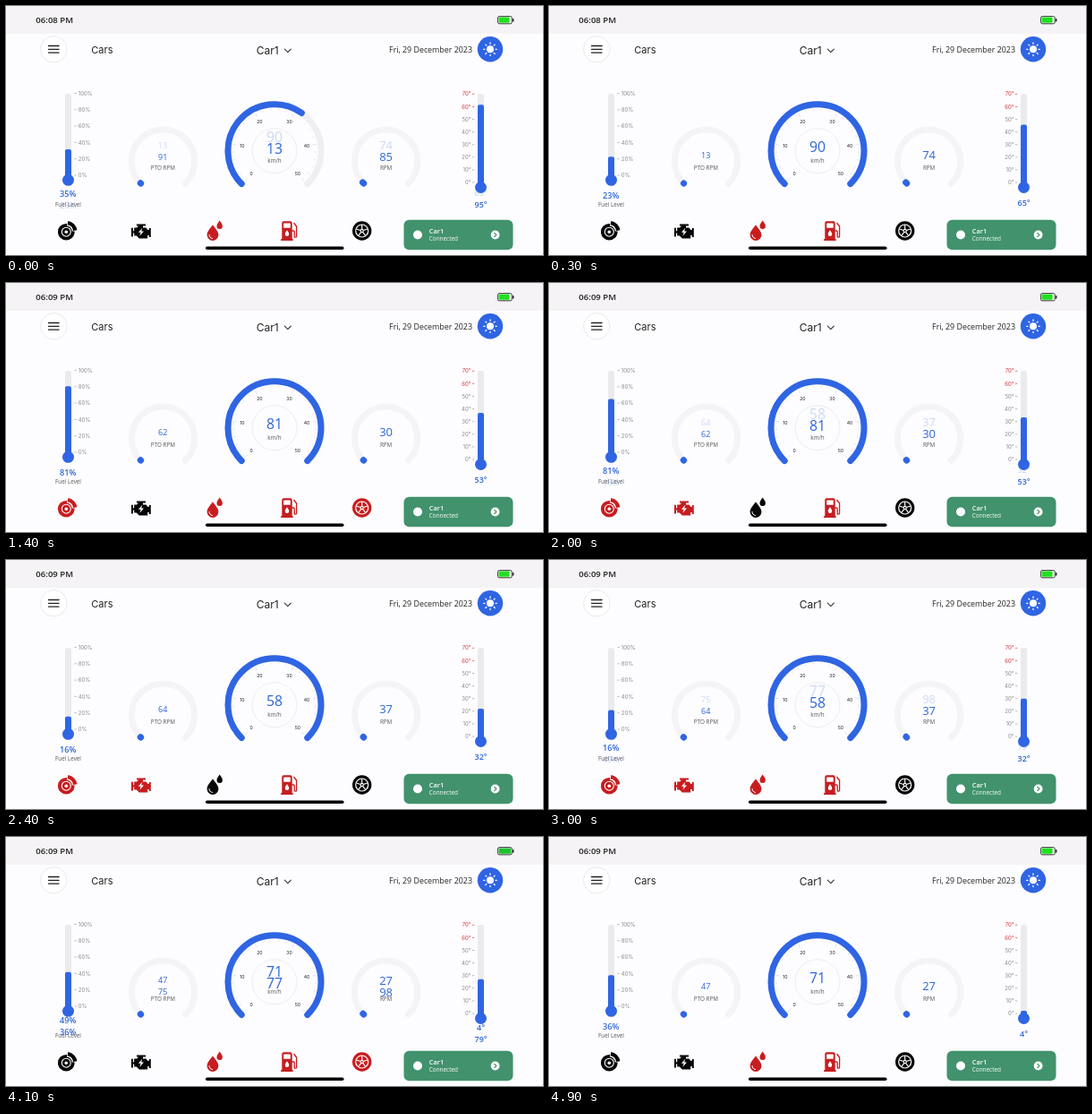
An HTML page that plays this animation: 600 px wide and 278 px high, repeating every 5 s.

```html
<!DOCTYPE html>
<html lang="en">
<head>
<meta charset="utf-8">
<title>Car dashboard</title>
<style>
  html, body { margin: 0; width: 100%; height: 100%; overflow: hidden; background: #fdfcfe; }
  svg { display: block; width: 100%; height: 100%; }
  text { font-family: "Open Sans", "Noto Sans", sans-serif; fill: #222; }
  .ui { font-family: Inter, sans-serif; }
  .mid { text-anchor: middle; }
  .end { text-anchor: end; }
  .value { fill: #2c66d6; text-anchor: middle; }
  .bold { font-weight: 600; }
  .scale { font: 6px Inter, sans-serif; fill: #8b8b90; }
  .hot { fill: #d8373c; }
  .unit { font-size: 6.3px; fill: #555; text-anchor: middle; }
  .white { fill: #fff; }
  .blue { fill: #2f65e3; }
  .line { fill: none; stroke-linecap: round; stroke-linejoin: round; }
  .icon { fill: currentColor; }
</style>
</head>
<body>
<svg id="stage" viewBox="0 0 600 278">
  <rect width="600" height="278" fill="#fdfcfe"/>
  <rect width="600" height="31" fill="#f5f3f5"/>
  <text id="clock" class="bold" x="33.3" y="18.7" font-size="9.6"></text>

  <rect x="549.6" y="11.6" width="15.6" height="8.2" rx="1.6" fill="#fff" stroke="#222" stroke-width=".9"/>
  <rect x="566" y="14" width="1.4" height="3.6" rx=".6" fill="#222"/>
  <rect id="charge" x="550.6" y="12.6" height="6.2" rx=".8"/>

  <circle cx="53.3" cy="48.3" r="14.7" fill="#fff" stroke="#e7e7ec" stroke-width=".9"/>
  <path class="line" d="M47.5 44.5h11.6M47.5 48.3h11.6M47.5 52.1h11.6" stroke="#222" stroke-width="1.3"/>
  <text class="ui" x="95.3" y="52.7" font-size="11">Cars</text>
  <text class="ui" x="279.7" y="54" font-size="12">Car1</text>
  <path class="line" d="M311.3 48.2l3.5 3.5 3.5-3.5" stroke="#333" stroke-width="1.1"/>
  <text class="end" x="521" y="51.6" font-size="8.9">Fri, 29 December 2023</text>
  <circle class="blue" cx="541" cy="48.3" r="14.2"/>
  <circle class="white" cx="541" cy="48.3" r="4"/>
  <g id="rays" class="line" stroke="#fff" stroke-width="1.3"></g>

  <g id="meters"></g>

  <g class="icon">
    <circle cx="67.3" cy="252.2" r="9.3"/>
    <circle cx="67.3" cy="252.2" r="5" fill="none" stroke="#fff" stroke-width="1.1"/>
    <circle class="white" cx="67.3" cy="252.2" r="1.8"/>
    <path d="M68.3 241.8A10.2 10.2 0 0 1 77.6 251.4" fill="none" stroke="#fdfcfe" stroke-width="7.4"/>
    <path d="M69 242.2A9.8 9.8 0 0 1 77.2 250.6" fill="none" stroke="currentColor" stroke-width="4.4"/>
  </g>
  <g class="icon">
    <path d="M146 243.5h10v2h-3v2h3.5l2 2.5h1.3v-2h2v10h-2v-2h-1.6v3.4h-9.4l-3-2.8h-2.6v-3.2h-1.2v4h-2v-9.6h2v3.4h1.2v-3.7h3l1.8-2h1v-0h-3z"/>
    <path class="white" d="M152.3 247.8l-4.4 5h2.7l-1.2 4 4.6-5.2h-2.8z"/>
  </g>
  <g class="icon">
    <path d="M231 244.2c2.5 4 6.4 7 6.4 11.3a6.4 6.4 0 0 1-12.8 0c0-4.300 3.900-7.300 6.400-11.300z"/>
    <path d="M238.700 239.600c1.200 2.200 3.200 3.800 3.200 6.200a3.200 3.200 0 0 1-6.400 0c0-2.400 2-4 3.200-6.200z"/>
    <path class="line" d="M227 255.500c0 2.300 1.500 3.700 3.500 4" stroke="#fff" stroke-width="1"/>
  </g>
  <g class="icon">
    <path d="M308.300 242.200q0-2 2-2h7.400q2 0 2 2v18h1v1.800h-13.600v-1.800h1.200z"/>
    <rect class="white" x="310.200" y="242.600" width="7.600" height="5.200" rx=".6"/>
    <path class="white" d="M314 250.300c1.300 2 2.200 2.900 2.200 4.400a2.200 2.200 0 0 1-4.400 0c0-1.500.9-2.400 2.200-4.400z"/>
    <path class="line" d="M319.700 251h1.500q1 0 1 1v5a1.200 1.200 0 0 0 2.400 0v-11l-2.800-3.500" stroke="currentColor" stroke-width="1.300"/>
  </g>
  <g class="icon">
    <circle cx="397.700" cy="251" r="10.700"/>
    <circle cx="397.700" cy="251" r="7" fill="none" stroke="#fff" stroke-width="1.200"/>
    <g id="spokes" class="line" stroke="#fff" stroke-width="1.200"></g>
    <circle class="white" cx="397.700" cy="251" r="2.200"/>
    <circle cx="397.700" cy="251" r="1"/>
  </g>

  <rect x="223" y="268.600" width="154.500" height="3.500" rx="1.750" fill="#000"/>
  <rect x="444.500" y="238.800" width="122" height="33.400" rx="6" fill="#41926d"/>
  <circle class="white" cx="460" cy="255.500" r="5"/>
  <text class="bold white" x="472.800" y="254.200" font-size="7.400">Car1</text>
  <text class="white" x="472.800" y="262" font-size="6.400">Connected</text>
  <circle class="white" cx="546.600" cy="255.500" r="4.900"/>
  <path class="line" d="M545.700 253.300l2.200 2.200-2.200 2.200" stroke="#41926d" stroke-width="1.200"/>
</svg>

<script>
const $ = id => document.getElementById(id);
const polar = (cx, cy, r, deg) => {
  const a = deg * Math.PI / 180;
  return [cx + r * Math.cos(a), cy + r * Math.sin(a)];
};
const spoke = (cx, cy, r1, r2, deg) =>
  `M${polar(cx, cy, r1, deg)}L${polar(cx, cy, r2, deg)}`;
const range = (n, f) => Array.from({ length: n }, (_, i) => f(i)).join('');
const arc = (cx, cy, r, sweep) =>
  `M${polar(cx, cy, r, 135)}A${r} ${r} 0 ${+(sweep > 180)} 1 ${polar(cx, cy, r, 135 + sweep)}`;

const gauges = [
  { key: 'speed', cx: 300, cy: 161.7, r: 52, max: 50, track: '#efeff1' },
  { key: 'pto', cx: 175.5, cy: 173.2, r: 35.2, max: 25000, track: '#f4f4f6' },
  { key: 'rpm', cx: 424.6, cy: 173.2, r: 35.2, max: 8000, track: '#f4f4f6' }
];
const tubes = [
  { key: 'fuel', x: 69.5, bottom: 189, bulb: 194.3, zero: 189.5, unit: 0.918 },
  { key: 'temp', x: 530.5, bottom: 198, bulb: 202.5, zero: 198, unit: 1 }
];
// Rolling readouts; enter is the side from which a new value slides in.
const readouts = [
  { key: 'speed', x: 300, y: 162.7, size: 15.8, enter: -1, suffix: '' },
  { key: 'pto', x: 175.2, y: 169.8, size: 9, enter: -1, suffix: '' },
  { key: 'rpm', x: 424.6, y: 171, size: 13, enter: -1, suffix: '' },
  { key: 'fuel', x: 69.3, y: 214.9, size: 9.2, enter: 1, suffix: '%', bold: true },
  { key: 'temp', x: 530.6, y: 222.7, size: 9, enter: -1, suffix: '°', bold: true }
];

const row = (speed, pto, rpm, fuel, temp) => ({ speed, pto, rpm, fuel, temp });
const states = [
  row(13, 91, 85, 35, 95), row(90, 13, 74, 23, 65), row(81, 62, 30, 81, 53),
  row(58, 64, 37, 16, 32), row(77, 75, 98, 49, 79), row(71, 47, 27, 36, 4),
  row(80, 50, 40, 96, 6)
];
// One digit per warning icon: 1 = red, 0 = black.
const warnings = ['00110', '10111', '11010', '11110', '00111', '00110'];

$('rays').innerHTML = `<path d="${range(8, i => spoke(541, 48.3, 6, 7.3, i * 45))}"/>`;
$('spokes').innerHTML = `<path d="${range(5, i => spoke(397.7, 251, 2.5, 6.5, i * 72 - 90))}"/>`;

const speed = gauges[0];
const dial = range(26, i =>
  `<path d="${spoke(speed.cx, speed.cy, i % 5 ? 45 : 43, 47, 135 + i * 10.8)}" stroke="#cbd5e8" stroke-width=".6"/>`
) + range(6, i => {
  const [x, y] = polar(speed.cx, speed.cy, 36.5, 135 + i * 54);
  return `<text class="ui mid" x="${x}" y="${y + 1.9}" font-size="5.2">${i * 10}</text>`;
}) + `<circle cx="300" cy="161.7" r="25" fill="none" stroke="#e9e9ee" stroke-width=".8"/>`;

const fuelScale = range(6, i => {
  const y = 99.6 + i * 18.3;
  return `<path d="M76.500 ${y - 2.1}h2.200" stroke="#9a9aa0" stroke-width=".7"/>
    <text class="scale" x="80.8" y="${y}">${100 - i * 20}%</text>`;
});
const tempScale = range(8, i => {
  const y = 100.4 + i * 14.1;
  return `<path d="M521 ${y - 2.1}h2.200" stroke="${i < 2 ? '#d8373c' : '#9a9aa0'}" stroke-width=".7"/>
    <text class="scale end ${i < 2 ? 'hot' : ''}" x="519.500" y="${y}">${70 - i * 10}°</text>`;
});

$('meters').innerHTML =
  gauges.map(g => `<g class="line" stroke-width="7">
    <path d="${arc(g.cx, g.cy, g.r, 270)}" stroke="${g.track}"/>
    <path id="arc-${g.key}" stroke="#2f65e3"/></g>`).join('') +
  dial + fuelScale + tempScale +
  tubes.map(t => `<rect x="${t.x - 3.5}" y="98" width="7" height="${t.bottom - 98}" rx="2.5" fill="#ebebed"/>
    <rect id="bar-${t.key}" class="blue" x="${t.x - 3.5}" width="7" rx="2"/>
    <circle class="blue" cx="${t.x}" cy="${t.bulb}" r="6.5"/>`).join('') +
  `<text class="unit" x="300" y="174.600">km/h</text>
   <text class="unit" x="175.400" y="183.400">PTO RPM</text>
   <text class="unit" x="424.600" y="183.400">RPM</text>
   <text class="unit" x="69.500" y="224">Fuel Level</text>` +
  readouts.map(r => ['old', 'new'].map(part =>
    `<text id="${part}-${r.key}" class="value ${r.bold ? 'bold' : ''}" x="${r.x}" font-size="${r.size}"></text>`
  ).join('')).join('');

const icons = [...document.querySelectorAll('g.icon')];
const LOOP = 5000, STEP = 100, LEAD = 100, TRAVEL = 13;
const smooth = u => {
  u = Math.min(1, Math.max(0, u));
  return u * u * (3 - 2 * u);
};

function place(id, text, y, opacity) {
  const el = $(id);
  el.textContent = text;
  el.setAttribute('y', y);
  el.setAttribute('opacity', opacity);
}

function render(time) {
  const t = Math.floor((time % LOOP) / STEP) * STEP;
  const turn = Math.floor((t + LEAD) / 1000);
  const elapsed = (t + LEAD) % 1000;
  const from = states[turn], to = states[turn + 1];
  const slide = smooth(elapsed / 400);
  const fill = smooth((elapsed + 60) / 500);
  const level = key => from[key] + (to[key] - from[key]) * fill;

  for (const g of gauges) {
    const sweep = Math.min(1, level(g.key) / g.max) * 270;
    $('arc-' + g.key).setAttribute('d', arc(g.cx, g.cy, g.r, sweep));
  }
  for (const b of tubes) {
    const top = b.zero - level(b.key) * b.unit;
    const bar = $('bar-' + b.key);
    bar.setAttribute('y', top);
    bar.setAttribute('height', b.bulb - top);
  }
  for (const r of readouts) {
    place('old-' + r.key, from[r.key] + r.suffix, r.y - r.enter * TRAVEL * slide, smooth(2 - 2 * slide));
    place('new-' + r.key, to[r.key] + r.suffix, r.y + r.enter * TRAVEL * (1 - slide), smooth(2 * slide));
  }
  icons.forEach((icon, i) => { icon.style.color = warnings[turn][i] === '1' ? '#c71d20' : '#050505'; });

  const charging = elapsed >= 200 && elapsed < 400;
  $('charge').setAttribute('width', charging ? 13.6 : 12);
  $('charge').setAttribute('fill', charging ? '#20c030' : '#1fe01f');
  $('clock').textContent = turn ? '06:09 PM' : '06:08 PM';
}

const start = performance.now();
function tick() {
  render(performance.now() - start);
  requestAnimationFrame(tick);
}
tick();
</script>
</body>
</html>
```
